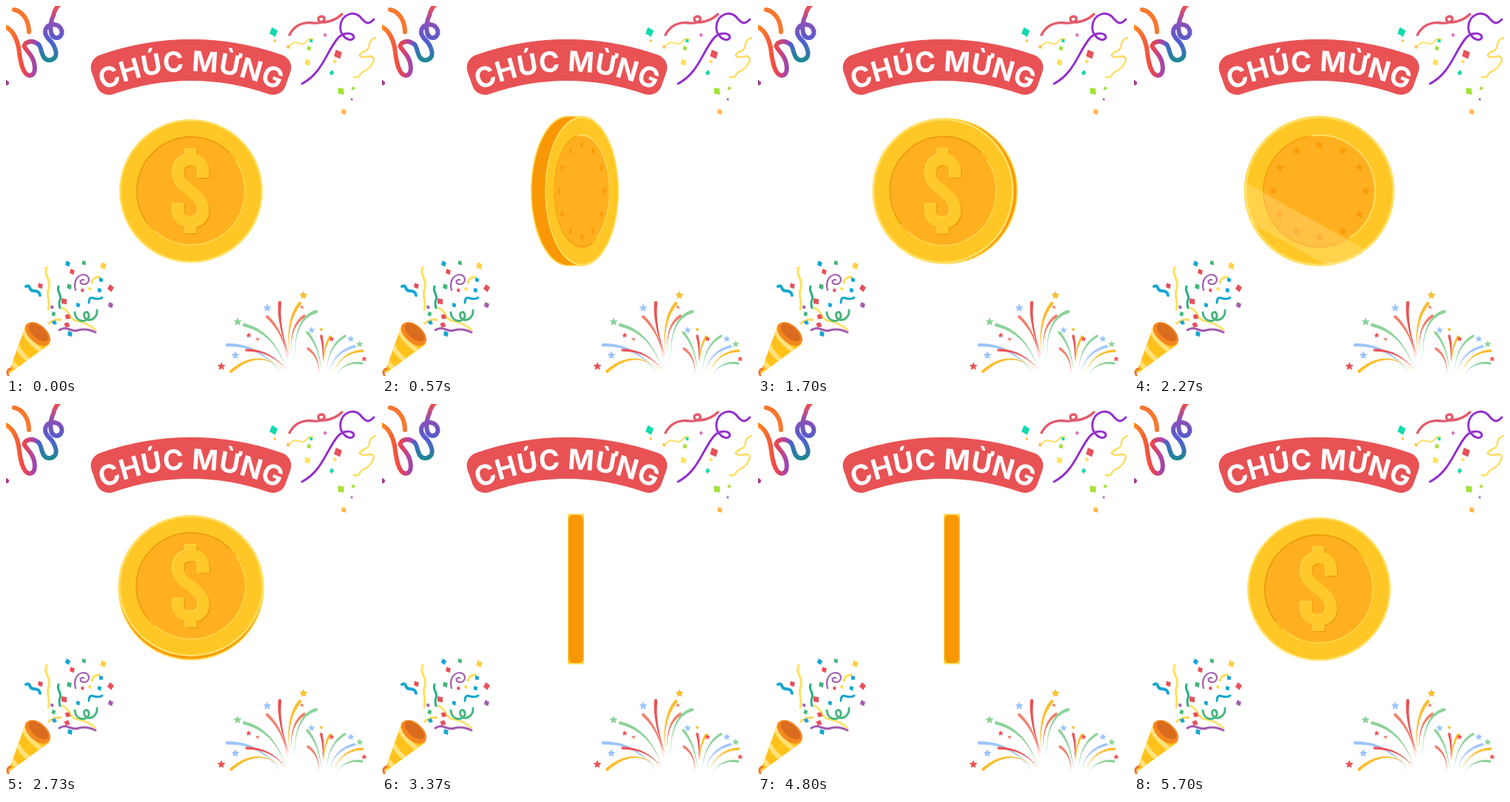
An HTML page with a canvas that plays this animation: 500 by 500 pixels, repeating every 5730 ms.

```html
<!DOCTYPE html>
<html lang="vi">
<head>
<meta charset="utf-8">
<style>
html, body { margin: 0; width: 100%; height: 100%; overflow: hidden; background: #fff; }
canvas, svg { position: absolute; left: 0; top: 0; width: 500px; height: 500px; }
svg path { stroke-linecap: round; stroke-linejoin: round; }
text { font: 700 38px Inter, "Open Sans", sans-serif; letter-spacing: .3px; fill: #fff; text-anchor: middle; }
</style>
</head>
<body>
<canvas id="coin" width="500" height="500"></canvas>
<svg id="art" viewBox="0 0 500 500" fill="none">
  <defs>
    <linearGradient id="warm" gradientUnits="userSpaceOnUse" x1="0" y1="0" x2="48" y2="0">
      <stop offset="0" stop-color="#ff8a1c"/><stop offset=".5" stop-color="#f0454a"/>
      <stop offset=".78" stop-color="#a845a8"/><stop offset="1" stop-color="#6a55c4"/>
    </linearGradient>
    <linearGradient id="cool" gradientUnits="userSpaceOnUse" x1="0" y1="0" x2="0" y2="75">
      <stop offset="0" stop-color="#f0504e"/><stop offset=".3" stop-color="#8a4fb8"/>
      <stop offset=".65" stop-color="#4f5fd0"/><stop offset="1" stop-color="#1a8a90"/>
    </linearGradient>
    <path id="arc" d="M92 136A285 285 0 0 1 408 136"/>
    <clipPath id="cone"><path d="M3 497L27 430Q45 436 59 457L8 494Z"/></clipPath>
  </defs>

  <path id="banner" fill="#e85254" stroke="#e85254" stroke-width="36"/>
  <text><textPath href="#arc" startOffset="50%">CHÚC MỪNG</textPath></text>

  <g stroke-width="6">
    <path d="M11 5C22 7 31 19 31 35" stroke="#f9772e"/>
    <path d="M-3 27C8 31 14 42 17 56C19 74 22 93 32 94C42 93 40 76 33 66C25 55 22 55 27 50Q35 45 44 52" stroke="url(#warm)"/>
    <path d="M44 52C49 56 47 75 60 73C74 70 66 52 57 44C49 35 54 24 65 25C79 27 78 43 68 43C57 42 60 21 64 13Q66 3 73 -3" stroke="url(#cool)"/>
    <path d="M-2 102L1 104" stroke="#a23c8e"/>
  </g>

  <g stroke-width="3">
    <path d="M400 105C427 91 432 64 448 44C457 34 471 36 470 43C465 51 450 40 452 26C454 12 468 6 478 14C486 24 490 26 497 18" stroke="#9430cc"/>
    <path d="M383 39C390 25 403 21 416 23C430 24 434 16 427 14C419 14 421 23 429 22Q444 21 454 11" stroke="#e25a6c" stroke-width="3.4"/>
    <path d="M384 53C393 43 398 57 406 48Q410 42 415 45" stroke="#ffe06a" stroke-width="2"/>
    <path d="M499 43C486 48 496 56 485 61C474 65 476 71 491 68C504 67 493 83 486 87C473 93 481 98 470 96" stroke="#ffdc5c" stroke-width="2.4"/>
  </g>

  <g>
    <path d="M3 497L27 430Q45 436 59 457L8 494Z" fill="#ffc21c"/>
    <g clip-path="url(#cone)" stroke="#ffe27a" stroke-width="6">
      <path d="M19 431Q31 458 55 470M12 452Q19 474 40 484M4 474Q10 487 22 495"/>
    </g>
    <path d="M6 490Q0 492 3 499" stroke="#f0762a" stroke-width="3"/>
    <ellipse cx="43" cy="443" rx="20" ry="12" transform="rotate(41 43 443)" fill="#f5871f"/>
    <ellipse cx="44" cy="441" rx="16" ry="8" transform="rotate(41 44 441)" fill="#d96c1e"/>
    <g stroke-width="3">
      <path d="M55 353C50 365 62 369 58 381C53 392 61 398 57 410" stroke="#ffe05c"/>
      <path d="M27 379C34 375 30 386 38 385Q45 385 46 391" stroke="#17a5d0" stroke-width="4"/>
      <path d="M71 379C68 387 76 390 73 397Q71 402 73 408" stroke="#28b082"/>
      <path d="M72 438C83 431 88 442 98 438Q109 435 121 441" stroke="#a45bb0"/>
      <path d="M76 408C87 411 84 424 97 426Q112 429 121 438" stroke="#ffe05c" stroke-width="2.5"/>
      <path d="M93 414C94 427 108 429 112 420C113 411 103 412 106 420C110 429 124 423 123 411" stroke="#46b57c"/>
      <path d="M94 384C91 372 96 363 106 363C115 366 113 376 105 376C98 375 100 369 105 370" stroke="#a45bb0" stroke-width="2.2"/>
      <path d="M58 429Q65 423 74 424" stroke="#ffd75a"/>
      <path d="M116 374Q118 366 126 366" stroke="#ffe05c"/>
      <path d="M112 401Q112 392 119 395Q126 397 130 394" stroke="#17a5d0"/>
    </g>
  </g>
</svg>
<script>
const art = document.getElementById('art');
const g = document.getElementById('coin').getContext('2d');
const PI = Math.PI;

function add(d, attrs) {
  const p = document.createElementNS('http://www.w3.org/2000/svg', 'path');
  p.setAttribute('d', d);
  for (const k in attrs) p.setAttribute(k, attrs[k]);
  art.append(p);
}

function starPath(x, y, r) {
  let d = '';
  for (let i = 0; i < 10; i++) {
    const q = i % 2 ? r * .46 : r, a = i * PI / 5;
    d += (i ? 'L' : 'M') + (x + q * Math.sin(a)) + ' ' + (y - q * Math.cos(a));
  }
  return d + 'Z';
}

// Banner: a ring sector around (250, 413)
const bx = r => r * Math.sin(.342), by = r => 413 - r * Math.cos(.342);
document.getElementById('banner').setAttribute('d',
  `M${250 - bx(350)} ${by(350)}A350 350 0 0 1 ${250 + bx(350)} ${by(350)}` +
  `L${250 + bx(330)} ${by(330)}A330 330 0 0 0 ${250 - bx(330)} ${by(330)}Z`);

// Confetti: x y size angle colour
`361 35 9 30 #12d9ae|448 65 9 25 #e8505b|452 115 8 8 #a4e23a|456 143 6 10 #ffb44a|407 76 7 20 #ffe05c
409 57 5 20 #a4e23a|381 55 4 20 #ffc04a|440 90 5 60 #12d9ae|469 111 4 50 #a4e23a|431 39 4 40 #e070c0
412 47 4 10 #12d9ae|444 75 4 30 #ffe05c|467 126 3 30 #b070d4|363 47 3 20 #ffc04a
83 348 6 30 #17a5d0|89 359 6 20 #e8505b|105 347 5 20 #46b57c|131 351 7 25 #ffcf45|46 378 6 20 #e8505b
126 384 5 15 #17a5d0|141 381 7 40 #e8505b|128 370 5 10 #17a5d0|141 404 6 25 #a45bb0|85 379 6 20 #46b57c
78 399 7 10 #e8505b|97 404 5 20 #17a5d0|64 416 5 25 #46b57c|83 420 6 -10 #e8505b|82 431 6 -15 #e8505b
65 428 5 -20 #17a5d0|113 382 4 30 #ffe05c|86 443 6 15 #17a5d0|103 384 4 20 #e8505b|62 407 4 15 #a45bb0`
  .split(/[|\n]/).forEach(row => {
    const [x, y, s, a, fill] = row.trim().split(' ');
    add(`M${-s / 2} ${-s / 2}h${s}l${s * .15} ${s}h${-s}Z`,
      { fill, transform: `translate(${x} ${y}) rotate(${a})` });
  });

const RED = '#ea5455', BLUE = '#9cc5ff', GREEN = '#8ed39c', GOLD = '#fbbd2d', CORAL = '#f0806c';

// Firework trail: thin at its base, w wide at the tip
function trail(x0, y0, cx, cy, x, y, w, fill) {
  const len = Math.hypot(x - cx, y - cy) * 2 / w;
  const nx = (cy - y) / len, ny = (x - cx) / len;
  add(`M${x0} ${y0}Q${cx + nx * .7} ${cy + ny * .7} ${x + nx} ${y + ny}` +
    `A${w / 2} ${w / 2} 0 0 0 ${x - nx} ${y - ny}Q${cx - nx * .7} ${cy - ny * .7} ${x0} ${y0}Z`, { fill });
}

[[372, 497, 344, 457, 299, 458, 4.5, BLUE], [379, 490, 361, 440, 322, 431, 4.5, GREEN],
 [381, 479, 375, 440, 353, 420, 4, CORAL], [383, 474, 367, 430, 370, 401, 4.5, RED],
 [383, 470, 378, 425, 397, 402, 4.5, GOLD], [386, 468, 383, 432, 403, 419, 4, CORAL],
 [390, 487, 387, 422, 419, 413, 4.5, GREEN], [379, 492, 358, 465, 325, 465, 3.5, RED],
 [382, 497, 343, 459, 304, 494, 4, GOLD],
 [426, 492, 423, 459, 407, 441, 3.5, GREEN], [428, 482, 430, 462, 426, 446, 3.5, RED],
 [430, 482, 429, 460, 438, 447, 3.5, GOLD], [423, 498, 424, 474, 408, 463, 3.5, CORAL],
 [433, 492, 436, 459, 458, 446, 3.5, GREEN], [437, 495, 443, 467, 471, 460, 3.5, BLUE],
 [441, 498, 453, 467, 482, 466, 3.5, GOLD], [446, 499, 459, 479, 481, 483, 3.5, GREEN]]
  .forEach(t => trail(...t));

[[313, 427, 6, GREEN], [353, 408, 6, BLUE], [402, 391, 6, GOLD], [328, 445, 4, RED], [310, 472, 6, BLUE],
 [291, 487, 6, RED], [340, 450, 3, CORAL], [400, 407, 3, CORAL], [413, 438, 5, BLUE], [426, 437, 3, GOLD],
 [440, 450, 4, RED], [466, 450, 5, BLUE], [478, 457, 5, GREEN], [484, 477, 4, RED]]
  .forEach(([x, y, r, fill]) => add(starPath(x, y, r), { fill }));

// Coin
const DOLLAR = new Path2D('M267 232V225C267 213 260 208 250 208S233 213 233 226C233 249 267 252 267 275' +
  'C267 287 260 292 250 292S233 287 233 275V267M250 193V208M250 292V307');
const STARS = new Path2D();
for (let i = 0; i < 12; i++)
  STARS.addPath(new Path2D(starPath(250 + 62.5 * Math.sin(i * PI / 6), 250 - 62.5 * Math.cos(i * PI / 6), 6.3)));

function disc(x, y, rx, ry, fill) {
  g.beginPath();
  g.ellipse(x, y, rx, ry, 0, 0, 2 * PI);
  g.fillStyle = fill;
  g.fill();
}

function arc(r, from, to, color, w) {
  g.beginPath();
  g.arc(250, 250, r, from, to);
  g.strokeStyle = color;
  g.lineWidth = w;
  g.stroke();
}

function face(front, shine) {
  const R = front ? 97 : 101, inner = front ? 74 : 76.5;
  disc(250, 250, R, R, '#ffe066');
  disc(250, 250, R - 2.5, R - 2.5, '#ffc726');
  disc(250, 250, inner, inner, '#ffb020');
  if (front) {
    arc(inner - 1, 2.5, 5.5, '#eb9d0c', 1.8);
    arc(inner - 1, -.6, 2.3, '#ffd94f', 1.6);
    g.lineWidth = 15;
    [[1.5, 1.5, '#ee9d10'], [-1.2, -.8, '#ffdc52'], [0, 0, '#ffc92b']].forEach(([x, y, c]) => {
      g.save();
      g.translate(x, y);
      g.strokeStyle = c;
      g.stroke(DOLLAR);
      g.restore();
    });
  } else {
    arc(inner - 1, 1.2, 4.5, '#f5a30f', 2);
    arc(inner - 1, -1.7, 1, '#ffe066', 2);
    g.fillStyle = '#f99b08';
    g.fill(STARS);
  }
  g.beginPath();
  g.arc(250, 250, R, 0, 2 * PI);
  g.clip();
  g.translate(250, 250);
  g.rotate(front ? -.5 : .51);
  g.fillStyle = 'rgba(255,240,170,.27)';
  g.fillRect(-120, shine - 22, 240, 44);
}

const ease = u => (u = Math.min(1, Math.max(0, u)), u * u * (3 - 2 * u));

function draw(step) {
  const h = step % 18;
  const spin = PI * ease((h - .5) / 9);   // about the vertical axis, front to back
  const flip = PI * ease((h - 10) / 6);   // about the horizontal axis, back to front
  const a = flip || spin, sin = Math.sin(a), scale = Math.abs(Math.cos(a));
  const front = flip ? flip > PI / 2 : spin < PI / 2;
  const kx = flip ? 1 : scale, ky = flip ? scale : 1;
  const at = t => flip ? [250, 250 + sin * (2 - 20 * t)] : [250 + sin * (1 + 22 * (1 - t)), 250];
  const R = front ? 97 + 4 * sin : 101;

  // Side wall: two discs and the band between their centres
  const hull = (r, inset, corner, color) => {
    const [x0, y0] = at(inset), [x1, y1] = at(1 - inset);
    disc(x0, y0, r * kx, r * ky, color);
    disc(x1, y1, r * kx, r * ky, color);
    const w = flip ? 2 * r : Math.abs(x1 - x0), v = flip ? Math.abs(y1 - y0) : 2 * r;
    g.beginPath();
    g.roundRect((x0 + x1 - w) / 2, (y0 + y1 - v) / 2, w, v, corner);
    g.fill();
  };

  g.clearRect(0, 0, 500, 500);
  if (sin > .01) {
    hull(R + .5, 0, 0, '#ffd94f');
    hull(R - 1, .05, 6 * sin, '#f99806');
  }
  if (scale < .02) return;
  g.save();
  g.translate(...at(front ? 1 : 0));
  const k = R / (front ? 97 : 101);
  g.scale(kx * k, ky * k);
  g.translate(-250, -250);
  face(front, front ? 27 - 45 * (step - 16) : 61 - 60 * (h - 9));
  g.restore();
}

// The coin advances every 80 ms, shown on a 30 fps clock
function frame() {
  const tick = Math.floor(performance.now() % 5730 * .03 + .15);
  draw((Math.floor(tick * 10 / 24) + 35) % 36);
  requestAnimationFrame(frame);
}
frame();
</script>
</body>
</html>
```
